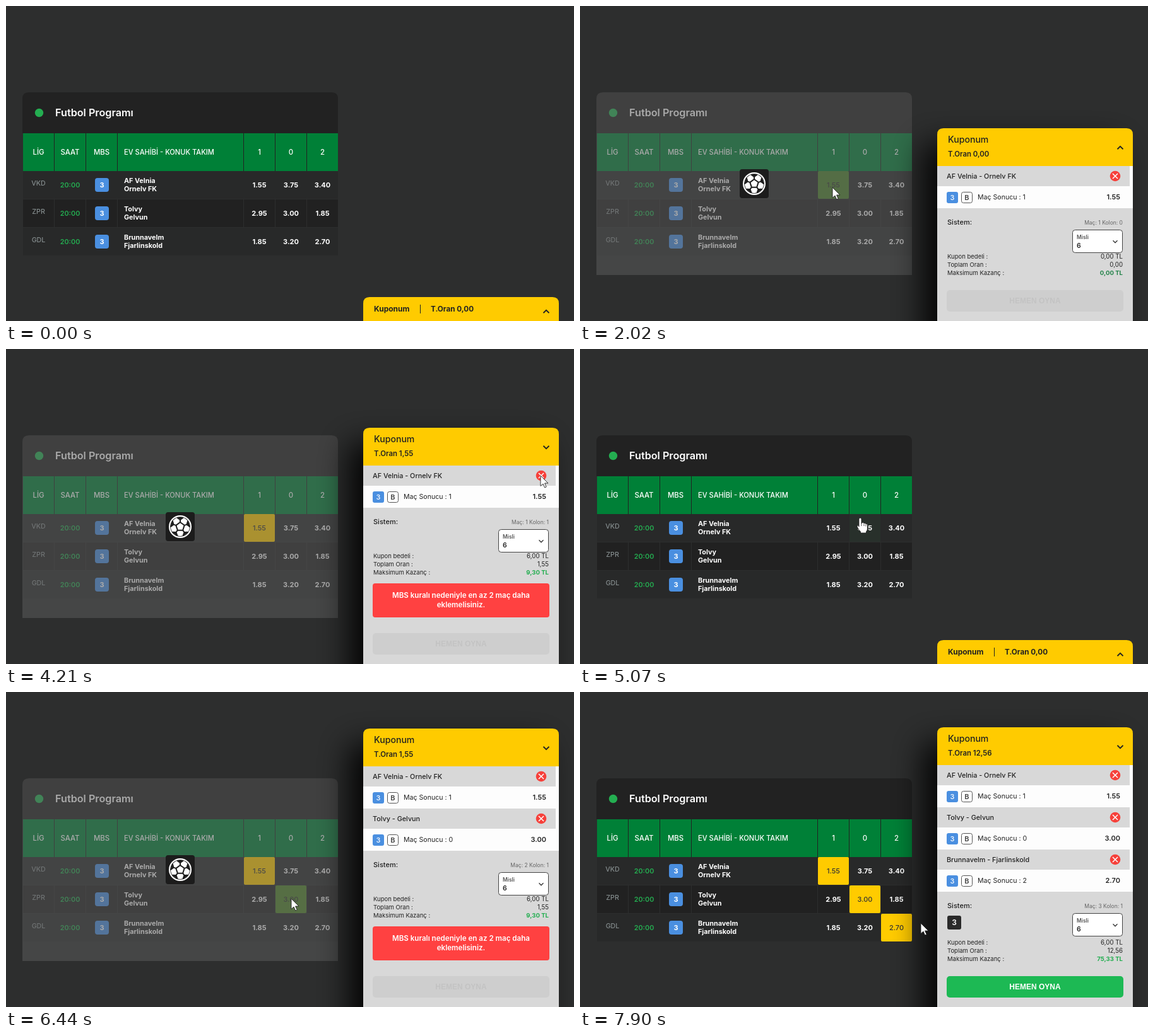
Recreate the animation shown at these times as an HTML page. Size 900 by 500 pixels, loop 7.99 s.

```html
<!DOCTYPE html>
<html lang="tr">
<head>
<meta charset="utf-8">
<style>
  html, body { margin: 0; width: 100%; height: 100%; overflow: hidden; background: #2d2e2e; }
  svg { display: block; font-family: Inter, Roboto, sans-serif; }
</style>
</head>
<body>
<svg id="stage" width="900" height="500" viewBox="0 0 900 500">
  <defs>
    <filter id="blur" x="-50%" y="-50%" width="200%" height="200%"><feGaussianBlur stdDeviation="24"/></filter>
  </defs>
  <g id="table"></g>
  <g id="live"></g>
</svg>
<script>
const LOOP = 7990, YELLOW = '#ffcb00', BLUE = '#4a8fe0', GREEN = '#24ae51';
const matches = [
  { league: 'VKD', home: 'AF Velnia', away: 'Ornelv FK', odds: ['1.55', '3.75', '3.40'] },
  { league: 'ZPR', home: 'Tolvy', away: 'Gelvun', odds: ['2.95', '3.00', '1.85'] },
  { league: 'GDL', home: 'Brunnavelm', away: 'Fjarlinskold', odds: ['1.85', '3.20', '2.70'] }
];
const totalOdds = ['0,00', '1,55', '4,65', '12,56'];
const winnings = ['0,00', '9,30', '27,90', '75,33'];

// start time, matches on the slip, matches already counted, loading
const states = [
  [0, 0, 0, 0], [1940, 1, 0, 1], [2170, 1, 1, 0], [4140, 1, 1, 1], [4370, 0, 0, 0],
  [5450, 1, 0, 1], [5830, 1, 1, 0], [6370, 2, 1, 1], [6600, 2, 2, 0], [7150, 3, 2, 1], [7450, 3, 3, 0]
];
// row and column, from, to
const picks = [[0, 1860, 4370], [0, 5300, LOOP], [1, 6290, LOOP], [2, 7070, LOOP]];
// time, x, y
const path = [
  [220, 783, 494], [460, 722, 491], [690, 718, 489], [770, 718, 488], [1000, 718, 488], [1790, 400, 288],
  [2490, 400, 288], [3280, 822, 227], [3430, 840, 213], [3750, 847, 201], [4610, 847, 201],
  [5070, 444, 269], [5330, 405, 278], [5830, 405, 278], [6210, 452, 328], [6600, 452, 328],
  [7000, 498, 372], [7450, 498, 372], [7830, 529, 367], [7900, 540, 367]
];

const clamp = v => Math.max(0, Math.min(1, v));
const rect = (x, y, w, h, fill, r = 0, more = '') =>
  `<rect x="${x}" y="${y}" width="${w}" height="${h}" rx="${r}" fill="${fill}" ${more}/>`;
const circle = (x, y, r, fill, more = '') => `<circle cx="${x}" cy="${y}" r="${r}" fill="${fill}" ${more}/>`;
const line = (d, color, w) => `<path d="${d}" fill="none" stroke="${color}" stroke-width="${w}"/>`;
const text = (s, x, y, size, weight, fill, anchor = 'start', more = '') =>
  `<text x="${x}" y="${y}" font-size="${size}" font-weight="${weight}" fill="${fill}" text-anchor="${anchor}" ${more}>${s}</text>`;
const chevron = (x, y, dir, w = 4.5, color = '#222', thick = 1.8) =>
  line(`M${x - w} ${y - dir * w / 2}l${w} ${dir * w}l${w} ${-dir * w}`, color, thick);
const topRound = (x, y, w, h, fill) =>
  `<path d="M${x} ${y + h}V${y + 10}q0-10 10-10h${w - 20}q10 0 10 10v${h - 10}z" fill="${fill}"/>`;

const cellX = c => 377 + 50 * c, rowY = r => 262 + 45 * r;
const oddsText = (r, c, picked) =>
  text(matches[r].odds[c], cellX(c) + 24.5, rowY(r) + 26, 11, picked ? 500 : 700, picked ? '#333' : '#fff', 'middle');

function table() {
  let s = topRound(26, 137, 500, 65, '#222') + circle(52.5, 169.5, 6.7, GREEN)
    + text('Futbol Programı', 78, 175, 16.2, 600, '#fff') + rect(27, 202, 499, 60, '#008037');
  const heads = [['LİG', 51.5], ['SAAT', 101.5], ['MBS', 151.5], ['1', 401.5], ['0', 451.5], ['2', 501.5]];
  for (const [name, x] of heads) s += text(name, x, 236, 11.4, 500, '#fff', 'middle');
  s += text('EV SAHİBİ - KONUK TAKIM', 187, 236, 11.1, 500, '#fff');
  matches.forEach((m, r) => {
    const y = rowY(r);
    s += rect(27, y, 499, 44, r % 2 ? '#212121' : '#282929')
      + text(m.league, 51.5, y + 23, 10.7, 500, '#838b8c', 'middle')
      + text('20:00', 101.5, y + 26, 10.8, 600, GREEN, 'middle')
      + rect(141, y + 11, 22, 22, BLUE, 4) + text('3', 152, y + 26, 11, 700, '#fff', 'middle')
      + text(m.home, 187, y + 19, 10.8, 700, '#fff') + text(m.away, 187, y + 32, 10.8, 700, '#fff');
    for (let c = 0; c < 3; c++) s += oddsText(r, c);
  });
  for (const x of [76, 126, 176, 376, 426, 476])
    s += rect(x, 202, 1, 60, '#222') + rect(x, 307, 1, 44, '#2d2e2e');
  return s;
}

function pickedCell(i, age, x, y) {
  const p = clamp(age / 400) ** 3;
  const mix = (a, b) => Math.round(a + (b - a) * p);
  const cx = cellX(i), cy = rowY(i);
  let s = rect(cx, cy, 49, 44, `rgb(${mix(62, 255)},${mix(122, 203)},${mix(47, 0)})`, 2);
  if (age < 160)
    s += `<clipPath id="cell">${rect(cx, cy, 49, 44, '#000')}</clipPath>`
      + circle(x, y, age / 4, '#d8d800', `opacity="${1 - age / 160}" clip-path="url(#cell)"`);
  return s + oddsText(i, i, true);
}

function ball() {
  let seams = '', patches = '';
  for (let k = 0; k < 5; k++) {
    seams += `<path transform="rotate(${72 * k})" d="M0-7V-11M0-7L6.7-2.2M-5-14.5L0-11L5-14.5"/>`;
    patches += `<path transform="rotate(${72 * k})" d="M-4.5-15L0-11.5L4.5-15z"/>`;
  }
  return rect(253, 259, 46, 46, '#1c1c1c', 4) + `<g transform="translate(276 282)">`
    + circle(0, 0, 18, '#fff') + circle(0, 0, 15.8, '#1c1c1c') + circle(0, 0, 15, '#fff')
    + `<g fill="none" stroke="#1c1c1c" stroke-width="2">${seams}</g><g fill="#1c1c1c">${patches}</g></g>`;
}

function slipItem(i, y) {
  const m = matches[i];
  return rect(566, y, 310, 67, '#fdfdfd') + rect(566, y, 305, 32, '#d8d8d8')
    + text(`${m.home} - ${m.away}`, 581, y + 20, 10.8, 500, '#222')
    + circle(848, y + 16, 8.3, '#f6403a') + line(`M844 ${y + 12}l8 8m0-8l-8 8`, '#fff', 1.5)
    + rect(581, y + 41, 18, 18, BLUE, 3) + text('3', 590, y + 54, 11, 500, '#fff', 'middle')
    + rect(604.5, y + 41.5, 17, 17, '#fff', 3, 'stroke="#555"') + text('B', 613, y + 54, 11, 600, '#444', 'middle')
    + text(`Maç Sonucu : ${'102'[i]}`, 630, y + 53, 10.6, 400, '#222')
    + text(m.odds[i], 856, y + 53, 11, 600, '#222', 'end');
}

function slip(n, done) {
  if (!n)
    return topRound(566, 462, 310, 38, YELLOW) + text('Kuponum', 583, 485, 12, 700, '#222')
      + rect(656, 474, 1, 14, '#222') + text('T.Oran 0,00', 673, 485, 11.7, 700, '#222') + chevron(856, 485, -1);
  const base = [321, 252, 252, 317][done], top = base - 60 - 67 * n, ready = done === 3;
  let s = rect(544, top + 24, 310, 560, '#000', 10, 'filter="url(#blur)" opacity=".9"')
    + topRound(566, top, 310, 60, YELLOW)
    + text('Kuponum', 583, top + 23, 14.1, 500, '#222')
    + text('T.Oran ' + totalOdds[done], 583, top + 45, 11.4, 600, '#222')
    + chevron(856, top + 31, done ? 1 : -1);
  for (let i = 0; i < n; i++) s += slipItem(i, top + 60 + 67 * i);
  s += rect(566, base, 310, 500 - base, '#d8d8d8')
    + text('Sistem:', 582, base + 26, 11, 500, '#222')
    + text(`Maç: ${n} Kolon: ${done ? 1 : 0}`, 860, base + 26, 8.5, 400, '#666', 'end')
    + rect(780.5, base + 34.5, 79, 36, '#fff', 4, 'stroke="#444"')
    + text('Misli', 787, base + 49, 8.4, 600, '#555') + text('6', 787, base + 63, 10.5, 600, '#222')
    + chevron(848, base + 53, 1, 3.5, '#333', 1.3);
  if (ready) s += rect(582, base + 38, 22, 22, '#2a2a2a', 3) + text('3', 593, base + 53, 12, 600, '#fff', 'middle');
  const sums = [
    ['Kupon bedeli :', (done ? '6,00' : '0,00') + ' TL'],
    ['Toplam Oran :', totalOdds[done]],
    ['Maksimum Kazanç :', winnings[done] + ' TL']
  ];
  sums.forEach(([label, value], i) => {
    const y = base + 80 + 13 * i + (ready ? 4 : 0);
    s += text(label, 582, y, 9.5, 400, '#222')
      + (i < 2 ? text(value, 860, y, 9.7, 400, '#222', 'end')
        : text(value, 860, y, 9.6, 700, done ? GREEN : '#24844a', 'end'));
  });
  if (done && !ready)
    s += rect(581, 372, 280, 54, '#ff4141', 4)
      + text(`MBS kuralı nedeniyle en az ${3 - done} maç daha`, 721, 395, 11.6, 600, '#fff', 'middle')
      + text('eklemelisiniz.', 721, 410, 11.6, 600, '#fff', 'middle');
  return s + rect(581, 451, 280, 34, ready ? '#1db954' : '#cecece', 5)
    + text('HEMEN OYNA', 721, 472, 12, 700, ready ? '#fff' : '#c3c3c3', 'middle', 'font-family="Liberation Sans, Arial, sans-serif"');
}

function pointAt(t) {
  const i = path.findIndex(p => p[0] > t);
  if (i < 0) return path[path.length - 1].slice(1);
  if (!i) return null;
  const [t0, x0, y0] = path[i - 1], [t1, x1, y1] = path[i];
  const k = (1 - Math.cos(Math.PI * (t - t0) / (t1 - t0))) / 2;
  return [x0 + (x1 - x0) * k, y0 + (y1 - y0) * k];
}

function cursor(x, y, hand) {
  const d = hand
    ? 'M-2 1a2 2 0 0 1 4 0v7l1-1a1.7 1.7 0 0 1 3 1a1.7 1.7 0 0 1 3 1a1.5 1.5 0 0 1 2.5 1v6q0 3-2 5v2h-9v-2q-2-2-5-7q-1-2 .5-3t2 2z'
    : 'M0 0V16.5l4-3.5l2.6 6l2.6-1.1l-2.6-5.9H12z';
  return `<path transform="translate(${x} ${y})" d="${d}" fill="#fff" stroke="#222" stroke-width=".9"/>`
    + (hand ? `<path transform="translate(${x} ${y})" d="M2 8v4M6 8.5v3.5M9 9.5v3" stroke="#222" stroke-width=".8"/>` : '');
}

function draw(t) {
  const [start, n, done, loading] = states.findLast(s => s[0] <= t);
  const tip = pointAt(t), [x, y] = tip || [-50, -50];
  const col = Math.floor((x - 377) / 50), row = Math.floor((y - 262) / 45);
  const onCell = x >= 377 && x < 526 && row >= 0 && row < 3;
  const onRemove = n && Math.hypot(x - 848, y - 201) < 10;
  const onBar = !n && x > 566 && y > 462;
  let s = '';
  if (onCell && !loading) s += rect(cellX(col), rowY(row), 49, 44, '#28302b') + oddsText(row, col);
  for (const [i, from, to] of picks) if (t >= from && t < to) s += pickedCell(i, t - from, x, y);
  if (loading)
    s += `<g opacity="${clamp((t - start + 20) / 80)}">` + topRound(26, 137, 500, 290, 'rgba(92,92,92,.52)') + ball() + '</g>';
  s += slip(n, done);
  if (t >= 3980 && t < 4140) s += circle(848, 201, 14.5, '#f6403a', 'opacity=".25"');
  if (tip) s += cursor(x, y, !loading && (onCell || onRemove || onBar));
  document.getElementById('live').innerHTML = s;
}

document.getElementById('table').innerHTML = table();
const begin = performance.now();
function tick() {
  draw((performance.now() - begin) % LOOP);
  requestAnimationFrame(tick);
}
tick();
</script>
</body>
</html>
```
